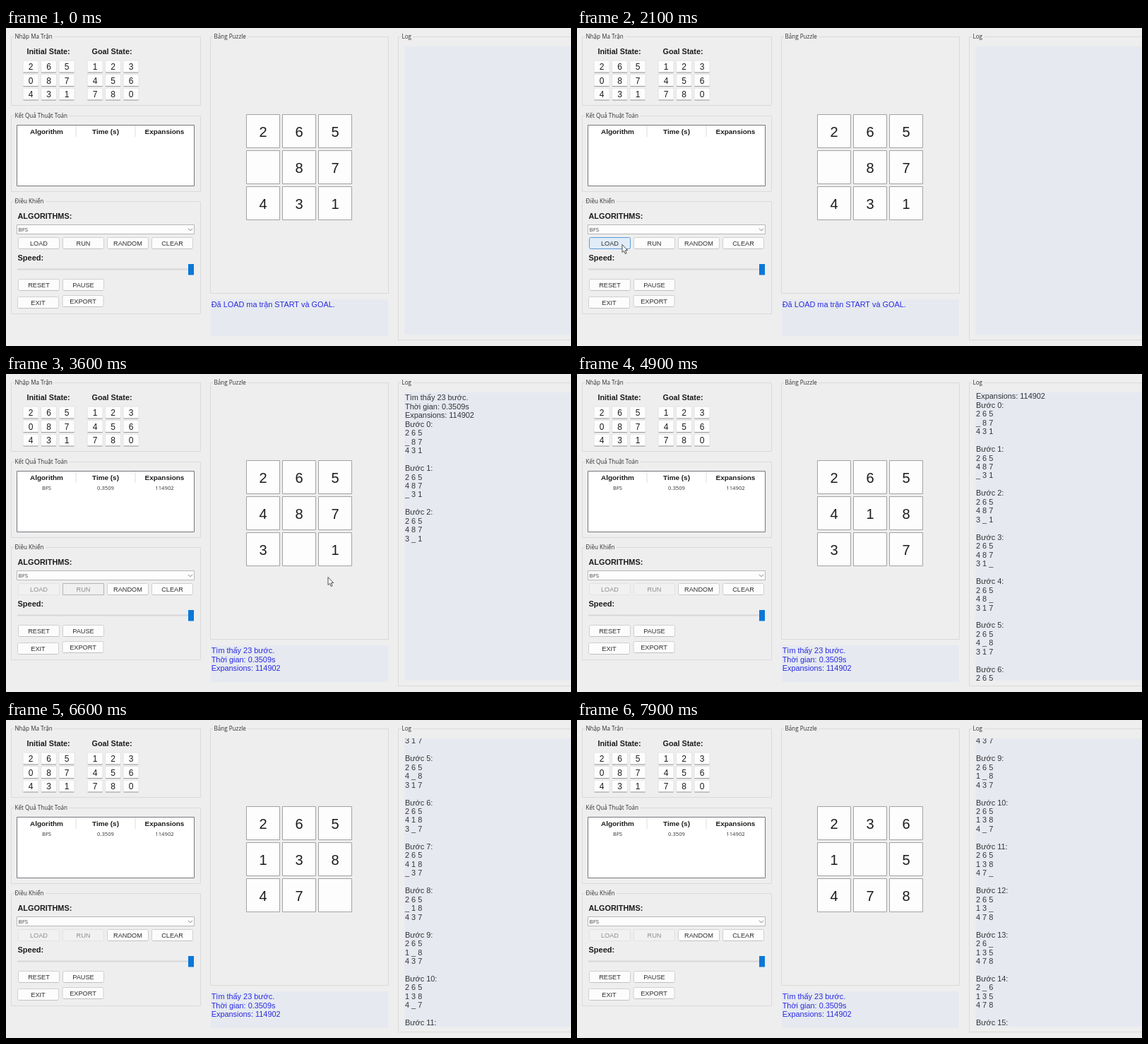
Animation, 800 px wide and 450 px high, one loop 8 s. Source, as an HTML page with a canvas:

```html
<!DOCTYPE html>
<html lang="vi">
<head>
<meta charset="utf-8">
<title>8-Puzzle</title>
<style>
html, body { margin: 0; width: 100%; height: 100%; overflow: hidden; background: #eeeeef; }
canvas { display: block; width: 800px; height: 450px; }
</style>
</head>
<body>
<canvas id="stage" width="800" height="450"></canvas>
<script>
const ctx = document.getElementById('stage').getContext('2d');
const SANS = '"Liberation Sans", Arial, sans-serif';
const UI = '"Open Sans", "Noto Sans", sans-serif';
const BG = '#eeeeef', FIELD = '#e6eaf0';
const LOOP = 8000, RUN_AT = 2600, FOUND_AT = 2780;
const FIRST_STEP = 2880, STEP = 330, SCROLL_LAG = 130, LINE = 12.47;

// Solve the board by following the blank
const blanks = [3, 6, 7, 8, 5, 4, 7, 6, 3, 4, 7, 8, 5, 2, 1, 4];
const boards = [[2, 6, 5, 0, 8, 7, 4, 3, 1]];
for (let i = 1; i < blanks.length; i++) {
  const b = boards[i - 1].slice();
  b[blanks[i - 1]] = b[blanks[i]];
  b[blanks[i]] = 0;
  boards.push(b);
}
const goal = [1, 2, 3, 4, 5, 6, 7, 8, 0];
const summary = ['Tìm thấy 23 bước.', 'Thời gian: 0.3509s', 'Expansions: 114902'];
const logLines = summary.slice();
boards.forEach((b, i) => {
  logLines.push(`Bước ${i}:`);
  for (let r = 0; r < 9; r += 3) logLines.push(b.slice(r, r + 3).map(v => v || '_').join(' '));
  logLines.push('');
});

function text(s, x, yMid, size, { color = '#1c1c1c', align = 'left', bold = false, font = SANS } = {}) {
  ctx.font = `${bold ? 'bold ' : ''}${size}px ${font}`;
  ctx.textAlign = align;
  ctx.fillStyle = color;
  ctx.fillText(s, x, yMid + size * 0.36);
}

function rect(x, y, w, h, fill, stroke, r = 0) {
  ctx.beginPath();
  ctx.roundRect(x, y, w, h, r);
  if (fill) { ctx.fillStyle = fill; ctx.fill(); }
  if (stroke) { ctx.strokeStyle = stroke; ctx.lineWidth = 1; ctx.stroke(); }
}

function panel(title, x, y, w, h) {
  rect(x + .5, y + .5, w, h, null, '#dadadb');
  ctx.font = `8.1px ${UI}`;
  rect(x + 4, y - 3, ctx.measureText(title).width + 4, 7, BG);
  text(title, x + 5.5, y, 8.1, { font: UI, color: '#303030' });
}

function grid(x, values) {
  values.forEach((v, i) => {
    const cx = x + (i % 3) * 25.5, cy = 54.5 + Math.floor(i / 3) * 19.5;
    rect(cx - 11, cy - 8.5, 22, 17, '#fdfdfd', '#e2e2e3', 1.5);
    rect(cx - 10.5, cy + 8, 21, 1, '#9a9a9c');
    text(v, cx, cy + .5, 12, { align: 'center' });
  });
}

function button(label, x, y, state) {
  const look = {
    hover: ['#e0ecf8', '#5b9bd5', '#303030'],
    press: ['#cce2f6', '#3f83c4', '#303030'],
    off: ['#f1f1f1', '#e2e2e3', '#8e8e90'],
    offFocus: ['#f0f0f0', '#b4b4b6', '#8e8e90']
  }[state] || ['#fcfcfc', '#d0d0d1', '#303030'];
  rect(x + .5, y + .5, 58, 16, look[0], look[1], state === 'offFocus' ? 0 : 2);
  if (!state) rect(x + 2, y + 16.3, 55, .8, '#bcbcbe');
  text(label, x + 29.5, y + 8.8, 9.2, { color: look[2], align: 'center' });
}

const ease = p => 1 - Math.pow(1 - p, 3);
const span = (t, a, b) => Math.min(1, Math.max(0, (t - a) / (b - a)));

function pointer(t) {
  if (t < 1200 || t >= 4000) return null;
  if (t < 2150) {
    const p = ease(span(t, 1150, 1950));
    return [716 - 652 * p, 288 + 18.5 * p + 14 * Math.sin(Math.PI * p)];
  }
  if (t < 2850) {
    const p = ease(span(t, 2250, 2500));
    return [64 + 46 * p, 306.5 - p];
  }
  const p = ease(span(t, 2850, 3400));
  return [110 + 346 * p, 305.5 - 18 * p];
}

function drawPointer([x, y]) {
  ctx.save();
  ctx.translate(x, y);
  ctx.beginPath();
  [[0, 0], [0, 11], [2.5, 8.8], [4.3, 13], [6.1, 12.2], [4.4, 8.2], [7.6, 8]]
    .forEach(p => ctx.lineTo(...p));
  ctx.closePath();
  ctx.fillStyle = '#fff';
  ctx.fill();
  ctx.strokeStyle = '#3a3a3c';
  ctx.lineWidth = .9;
  ctx.stroke();
  ctx.restore();
}

function drawControls(t, mouse) {
  panel('Điều Khiển', 7, 245, 268, 159);
  text('ALGORITHMS:', 16.5, 266, 10.9, { bold: true });
  rect(15.5, 278.5, 251, 13, '#fdfdfd', '#b8b8ba');
  text('BFS', 17.5, 285.3, 8, { font: UI, color: '#404040' });
  ctx.beginPath();
  ctx.moveTo(258, 283.8);
  ctx.lineTo(261, 286.8);
  ctx.lineTo(264, 283.8);
  ctx.strokeStyle = '#707072';
  ctx.lineWidth = .9;
  ctx.stroke();

  ['LOAD', 'RUN', 'RANDOM', 'CLEAR'].forEach((label, i) => {
    const x = 17 + i * 63.1;
    let state = '';
    if (i < 2 && t >= RUN_AT) state = i && t < 4000 ? 'offFocus' : 'off';
    else if (mouse && mouse[0] >= x && mouse[0] < x + 59 && mouse[1] > 296 && mouse[1] < 313) {
      const pressed = i === 0 ? t > 2150 && t < 2250 : i === 1 && t > 2520;
      state = pressed ? 'press' : 'hover';
    }
    button(label, Math.round(x), 296, state);
  });
  text('Speed:', 16.5, 325, 11, { bold: true });
  rect(16, 340.5, 250, 2, '#d8d8d9');
  rect(258, 334, 8, 15.5, '#0a78d7');
  button('RESET', 17, 355);
  button('PAUSE', 80, 355);
  button('EXIT', 16, 380);
  button('EXPORT', 79.5, 378);
}

function drawResults(t) {
  panel('Kết Quả Thuật Toán', 7, 124, 268, 107);
  rect(15.5, 137.5, 251, 86, '#fff', '#74787c');
  rect(98.5, 138, 1, 16, '#dedee0');
  rect(182.5, 138, 1, 16, '#dedee0');
  [['Algorithm', 'BFS', 57.5], ['Time (s)', '0.3509', 141], ['Expansions', '114902', 224.5]]
    .forEach(([head, value, x]) => {
      text(head, x, 146.2, 9.95, { bold: true, align: 'center' });
      if (t >= FOUND_AT) text(value, x, 161, 7.7, { font: UI, align: 'center', color: '#333' });
    });
}

function drawBoard(step) {
  panel('Bảng Puzzle', 289, 12, 252, 363);
  boards[step].forEach((v, i) => {
    const x = 340.5 + (i % 3) * 51, y = 122.5 + Math.floor(i / 3) * 51;
    rect(x, y, 47, 47, '#fdfdfd', '#a2a2a4');
    if (v) text(v, x + 23.5, y + 24.3, 20, { align: 'center' });
  });
}

function scrollOf(step) {
  if (step < 5) return 0;
  return step === 5 ? 27 : LINE * (5 * step + 6) - 370;
}

function drawLog(t, step) {
  panel('Log', 555, 12, 260, 429);
  rect(564, 26, 236, 408, FIELD);
  if (t < FOUND_AT) return;
  const shown = t < FIRST_STEP ? 3 : 3 + 5 * (step + 1);
  const settled = t - FIRST_STEP - step * STEP >= SCROLL_LAG ? step : step - 1;
  const top = 33.4 - scrollOf(settled);
  ctx.save();
  ctx.beginPath();
  ctx.rect(564, 26, 236, 408);
  ctx.clip();
  logLines.slice(0, shown).forEach((s, i) => {
    const y = top + i * LINE;
    if (y > 15 && y < 436) text(s, 565, y, 10.9, { color: '#333336' });
  });
  ctx.restore();
}

function drawStatus(t) {
  rect(290, 384, 251, 52, FIELD);
  const lines = t < FOUND_AT ? ['Đã LOAD ma trận START và GOAL.'] : summary;
  lines.forEach((s, i) => text(s, 290.7, 391.5 + i * LINE, 10.9, { color: '#2a2ae0' }));
}

function draw(t) {
  const step = Math.min(15, Math.max(0, Math.floor((t - FIRST_STEP) / STEP)));
  const mouse = pointer(t);
  rect(0, 0, 800, 450, BG);
  panel('Nhập Ma Trận', 7, 12, 268, 97);
  text('Initial State:', 29.5, 33.5, 10.8, { bold: true });
  text('Goal State:', 121.5, 33.5, 10.8, { bold: true });
  grid(35, boards[0]);
  grid(126, goal);
  drawResults(t);
  drawControls(t, mouse);
  drawBoard(step);
  drawStatus(t);
  drawLog(t, step);
  if (mouse) drawPointer(mouse);
}

const start = performance.now();
function tick() {
  draw((performance.now() - start) % LOOP);
  requestAnimationFrame(tick);
}
tick();
</script>
</body>
</html>
```
